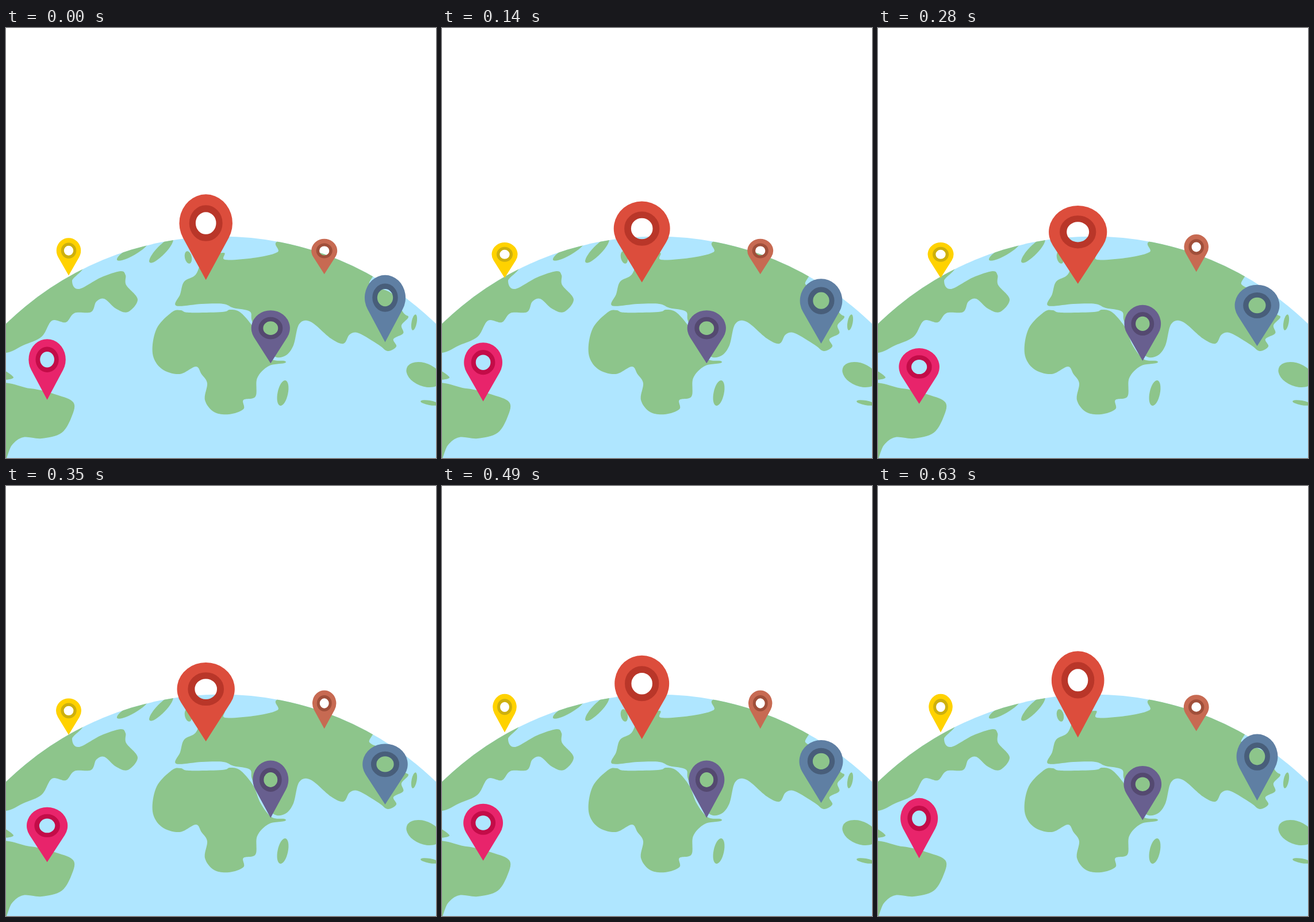
An HTML page that plays this animation: 748 px wide and 748 px high, repeating every 0.7 s.

```html
<!DOCTYPE html>
<html lang="en">
<head>
<meta charset="utf-8">
<title>Map pins on a globe</title>
<style>
  @property --turn {
    syntax: "<angle>";
    inherits: false;
    initial-value: 0deg;
  }
  html, body { margin: 0; width: 100%; height: 100%; overflow: hidden; background: #fff; }
  svg { display: block; width: 100vw; height: 100vh; }
  .sea { fill: #afe6ff; }
  .land { fill: #8dc58b; }
  .body { fill: var(--tone); fill-rule: evenodd; }
  .ring { fill: none; stroke: var(--ring); stroke-width: .24; }

  .pin { transform: translate(var(--x), var(--y)); }
  .size { transform: scale(var(--size)); }

  /* Each pin sinks and squashes about its tip, lowest at its own --peak. */
  .bob {
    --u: cos(var(--turn));
    transform: translateY(calc(3.74px * var(--u)))
               scale(calc(1 + .05 * var(--u)), calc(1 - .05 * var(--u)));
    animation: turn 700ms steps(10) calc(var(--peak) - 700ms) infinite;
  }
  @keyframes turn {
    from { --turn: 0deg; }
    to { --turn: 360deg; }
  }

  .yellow { --x: 109px; --y: 431.6px; --size: 21.6; --peak: 210ms; --tone: #ffd200; --ring: #cdb00d; }
  .brown { --x: 553.7px; --y: 425.3px; --size: 21.6; --peak: 70ms; --tone: #c76a52; --ring: #a04f3a; }
  .red { --x: 347.7px; --y: 441.3px; --size: 48.2; --peak: 280ms; --tone: #dc4d3c; --ring: #b93629; }
  .blue { --x: 659.5px; --y: 550.2px; --size: 37.4; --peak: 350ms; --tone: #5f7fa3; --ring: #485e7a; }
  .purple { --x: 460.3px; --y: 580.2px; --size: 32.3; --peak: 70ms; --tone: #685f8f; --ring: #544970; }
  .pink { --x: 71.6px; --y: 650.6px; --size: 33.9; --peak: 350ms; --tone: #e8246b; --ring: #c30c48; }
</style>
</head>
<body>
<svg viewBox="0 0 748 748">
  <defs>
    <circle id="globe" cx="374" cy="898.5" r="536"/>
    <clipPath id="disc"><use href="#globe"/></clipPath>
    <g id="pin">
      <path class="body" d="M0 0L-.861-1.461A1 1 0 1 1 .861-1.461ZM.45-1.97a.45 .45 0 1 0-.9 0a.45 .45 0 1 0 .9 0Z"/>
      <circle class="ring" cy="-1.97" r=".505"/>
    </g>
  </defs>

  <use href="#globe" class="sea"/>

  <g class="land" clip-path="url(#disc)">
    <!-- North America -->
    <path data-via="126,408 115,440 127,454 165,434 199,423 208,430 209,447 229,472 212,494 191,488 171,471 157,476 148,494 119,496 104,512 80,509 62,537 30,552 0,565 -40,560 -40,400"/>
    <!-- South America -->
    <path data-via="-20,627 42,627 88,638 117,651 115,674 97,704 62,714 30,712 10,726 -8,756"/>
    <!-- Europe and Asia -->
    <path data-via="296,483 303,463 310,441 330,429 345,400 379,391 381,403 430,400 472,390 486,369 680,380 637,434 636,449 670,461 691,495 700,503 688,517 691,531 674,541 679,554 664,562 648,551 614,531 598,533 587,549 565,540 530,511 510,515 500,552 486,570 466,571 444,546 428,510 424,493 396,487 378,480 340,480"/>
    <!-- Africa -->
    <path data-via="289,494 262,523 255,566 271,593 302,602 330,589 340,602 350,618 346,647 362,668 388,672 413,663 413,647 434,641 437,609 457,588 484,583 484,579 462,576 443,552 430,521 408,495 390,490 376,494 318,495 304,491"/>
    <path data-via="-8,594 13,608 -8,611"/>
    <!-- Greenland -->
    <ellipse rx="31" ry="7.5" transform="translate(220 388) rotate(-30)"/>
    <ellipse rx="29" ry="8" transform="translate(270 387) rotate(-46)"/>
    <!-- Britain, Madagascar, Japan, Australia, New Zealand -->
    <ellipse rx="6" ry="11" transform="translate(317 399) rotate(-12)"/>
    <ellipse rx="9" ry="22.5" transform="translate(481.5 635) rotate(12)"/>
    <ellipse rx="4.5" ry="14" transform="translate(710 512) rotate(10)"/>
    <ellipse rx="32" ry="20" transform="translate(727 603) rotate(22)"/>
    <ellipse rx="16" ry="4" transform="translate(737 652) rotate(10)"/>
  </g>

  <g id="pins"></g>
</svg>
<script>
  // Closed smooth curve through the given points (Catmull-Rom as Béziers).
  function smooth(points) {
    const n = points.length;
    const at = i => points[(i + n) % n];
    let d = "M" + at(0);
    for (let i = 0; i < n; i++) {
      const [a, b, c, e] = [at(i - 1), at(i), at(i + 1), at(i + 2)];
      const out = b.map((v, k) => v + (c[k] - a[k]) / 6);
      const into = c.map((v, k) => v - (e[k] - b[k]) / 6);
      d += `C${out} ${into} ${c}`;
    }
    return d + "Z";
  }

  for (const path of document.querySelectorAll("[data-via]")) {
    const points = path.dataset.via.split(" ").map(p => p.split(",").map(Number));
    path.setAttribute("d", smooth(points));
  }

  const pins = ["yellow", "brown", "red", "blue", "purple", "pink"];
  document.getElementById("pins").innerHTML = pins.map(name =>
    `<g class="pin ${name}"><g class="bob"><use href="#pin" class="size"/></g></g>`
  ).join("");
</script>
</body>
</html>
```
